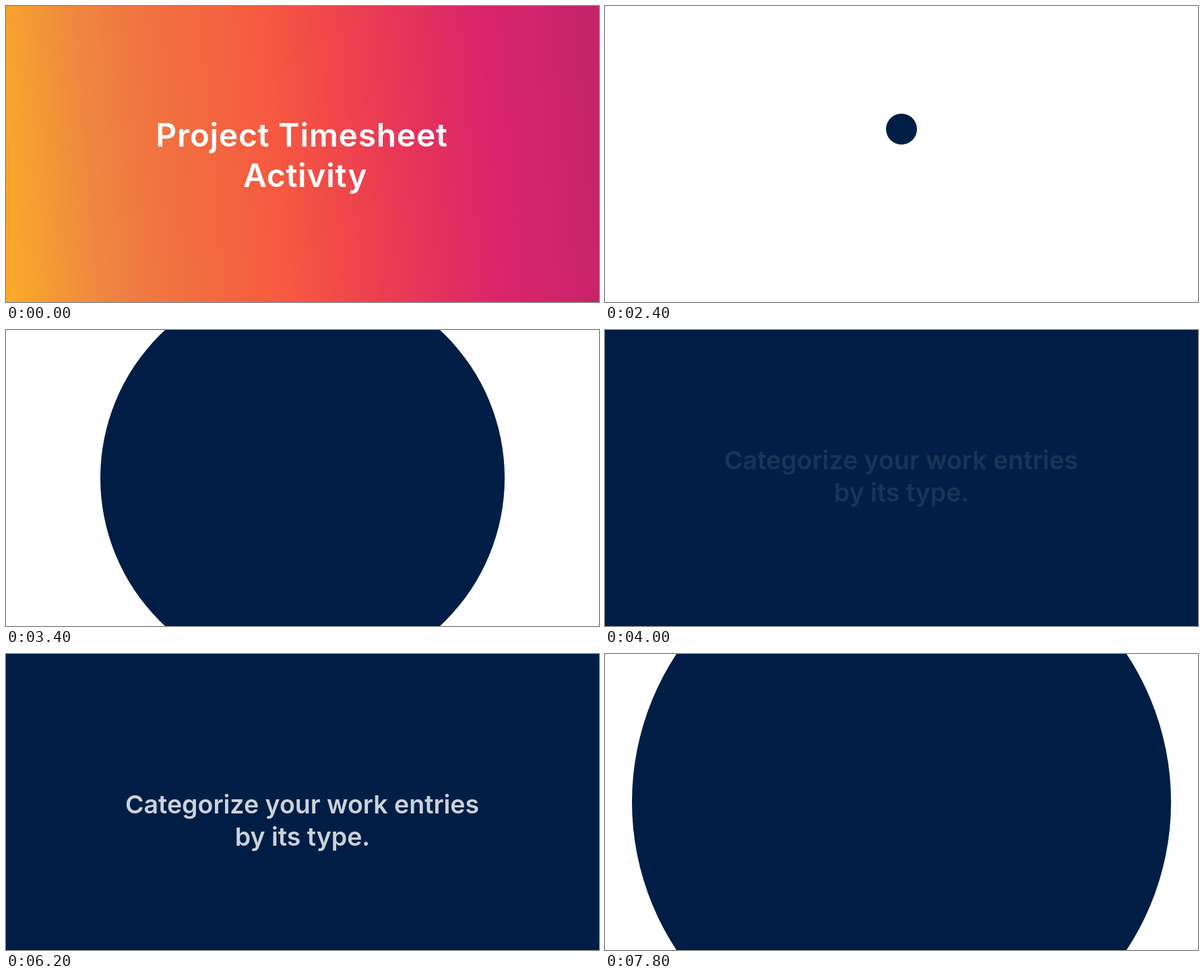
An HTML page with a canvas for the animation above (8 s loop, 880x440 px).

```html
<!DOCTYPE html>
<html lang="en">
<head>
<meta charset="utf-8">
<title>Project Timesheet Activity</title>
<style>
  html, body { margin: 0; width: 100%; height: 100%; overflow: hidden; background: #fff; }
  canvas { display: block; width: 880px; height: 440px; }
</style>
</head>
<body>
<canvas id="stage" width="880" height="440"></canvas>
<script>
const W = 880, H = 440, CX = W / 2, CY = H / 2;
const LOOP = 8000, STEP = 200;
const NAVY = '#001e45';
const ctx = document.getElementById('stage').getContext('2d');

const sky = makeGradient(85, [
  [0, '#fba92a'], [0.05, '#f6a030'], [0.16, '#ee8641'], [0.24, '#f17641'],
  [0.35, '#f36840'], [0.46, '#f65840'], [0.53, '#f24c47'], [0.61, '#ec3e51'],
  [0.7, '#e4325c'], [0.81, '#d9246c'], [0.9, '#cf246b'], [1, '#c12468']
]);

function makeGradient(deg, stops) {
  const a = deg * Math.PI / 180, dx = Math.sin(a), dy = -Math.cos(a);
  const half = (W * Math.abs(dx) + H * Math.abs(dy)) / 2;
  const g = ctx.createLinearGradient(CX - dx * half, CY - dy * half, CX + dx * half, CY + dy * half);
  stops.forEach(([at, color]) => g.addColorStop(at, color));
  return g;
}

function fill(color) {
  ctx.fillStyle = color;
  ctx.fillRect(0, 0, W, H);
}

function disc(y, r) {
  ctx.fillStyle = NAVY;
  ctx.beginPath();
  ctx.arc(CX, y, r, 0, Math.PI * 2);
  ctx.fill();
}

function text(str, x, y, size, spacing, alpha = 1) {
  ctx.font = `600 ${size}px Inter, "Open Sans", sans-serif`;
  ctx.letterSpacing = spacing + 'px';
  ctx.textAlign = 'center';
  ctx.fillStyle = `rgba(255, 255, 255, ${alpha})`;
  ctx.fillText(str, x, y);
}

function title() {
  fill(sky);
  text('Project Timesheet', 439, 209, 48, 0.7);
  text('Activity', 444, 269, 48, 0.7);
}

function caption(dy, alpha) {
  text('Categorize your work entries', 439.5, 207 + dy, 37.5, 0, alpha);
  text('by its type.', 440, 255 + dy, 37.5, 0, alpha);
}

// The drop keeps an even pace for two steps, then speeds up.
function drop(i) {
  disc(1 + 16.5 * i + 1.39 * Math.max(0, i - 2) ** 2, 15 + i);
}

function draw(t) {
  const since = start => Math.floor((t - start) / STEP);
  if (t < 1200) {
    title();
    if (t >= 600) drop(t < 900 ? 0 : 1);
    return;
  }
  fill('#fff');
  if (t < 2600) {
    drop(2 + since(1200));
  } else if (t < 4000) {
    const i = since(2600);
    disc(CY, i < 2 ? 25 * (i + 1) : 100 * (i - 1));
  } else if (t < 7800) {
    fill(NAVY);
    const i = since(6000) + 1;
    if (i <= 0) caption(0, Math.min(1, (since(4000) + 1) / 10));
    else caption(15 * i + 0.625 * Math.max(0, i - 2) ** 2, 1 - i / 10);
  } else {
    disc(CY, 400);
  }
}

function tick() {
  draw(performance.now() % LOOP);
  requestAnimationFrame(tick);
}
tick();
</script>
</body>
</html>
```
